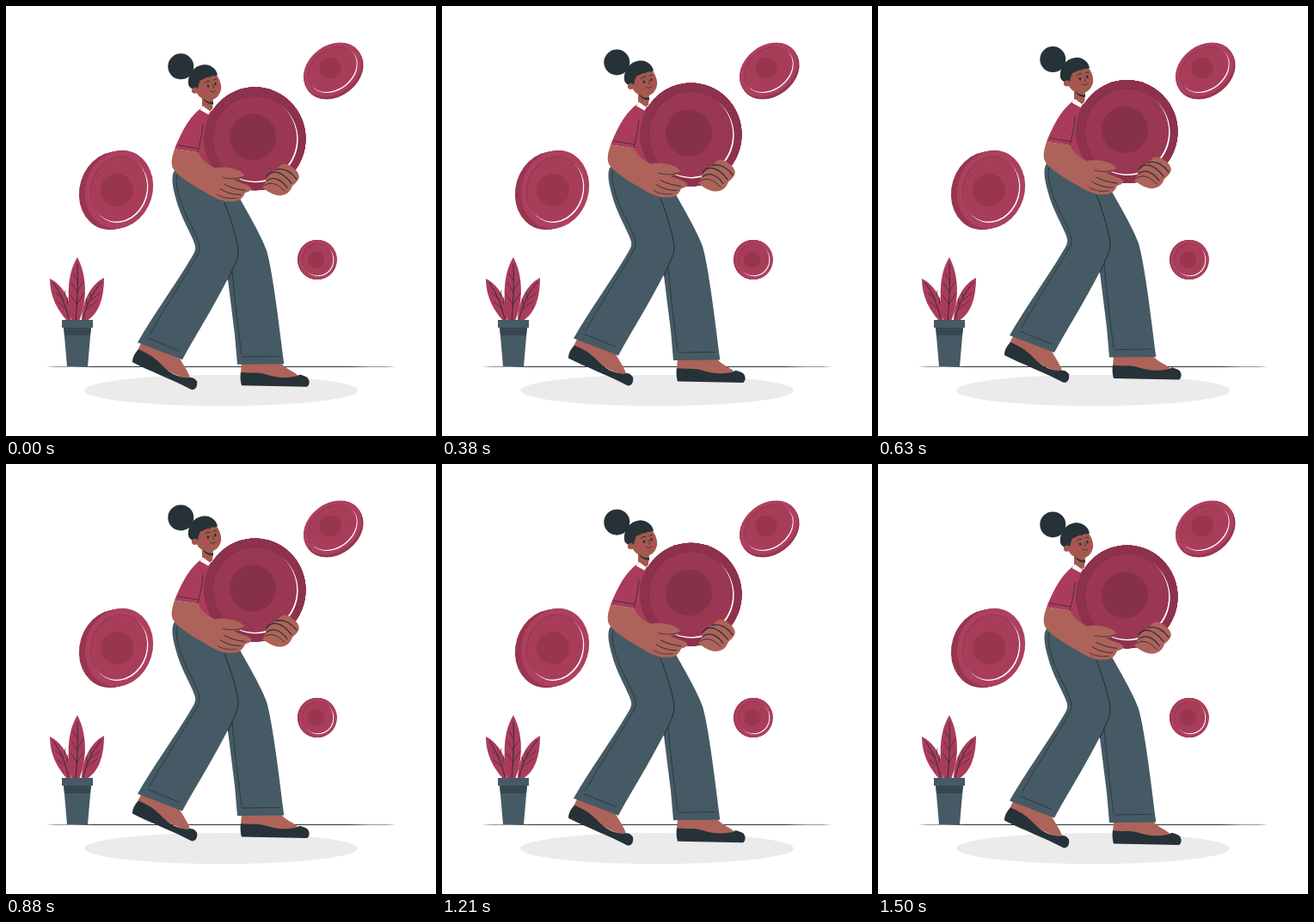
An HTML page with a canvas that plays this animation: 500 px wide and 500 px high, repeating every 1.54 s.

```html
<!DOCTYPE html>
<html lang="en">
<head>
<meta charset="utf-8">
<title>Carrying a coin</title>
<style>
  html, body { margin: 0; width: 100%; height: 100%; overflow: hidden; background: #fff; }
  canvas { display: block; width: 100vw; height: 100vh; }
</style>
</head>
<body>
<canvas id="stage"></canvas>
<script>
const SIZE = 500, LOOP = 1540, PEAK = 733, LIFT = 8.7;
const INK = '#263238', SLATE = '#455a64', SLATE_DARK = '#37474f';
const RED = '#ab3b5b', RED_MID = '#9a3752';
const SKIN = '#ad6359', FACE = '#a3594d';

const canvas = document.getElementById('stage');
const ctx = canvas.getContext('2d');
const scale = window.devicePixelRatio || 1;
canvas.width = canvas.height = SIZE * scale;

const cache = new Map();
function path(d) {
  if (!cache.has(d)) cache.set(d, new Path2D(d));
  return cache.get(d);
}
function fill(d, color) {
  ctx.fillStyle = color;
  ctx.fill(path(d));
}
function stroke(d, width = 0.8, color = INK) {
  ctx.lineWidth = width;
  ctx.strokeStyle = color;
  ctx.stroke(path(d));
}
function oval(x, y, rx, ry, color, turn = 0) {
  ctx.fillStyle = color;
  ctx.beginPath();
  ctx.ellipse(x, y, rx, ry, turn, 0, Math.PI * 2);
  ctx.fill();
}

// Stacked ovals: thick edge, rim, shaded and lit lips, face, plain emblem.
function coin({ x, y, rx, ry, turn = 0, edge = [0, 0], rim, face, dark, inset, lip, emblem }) {
  const [ex, ey] = edge;
  for (let i = 4; i > 0; i--) oval(x + ex * i / 4, y + ey * i / 4, rx, ry, dark, turn);
  oval(x, y, rx, ry, rim, turn);
  const ix = rx * inset, iy = ry * inset;
  oval(x + lip, y + lip, ix, iy, '#fff', turn);
  oval(x - lip * 0.8, y - lip * 0.8, ix, iy, dark, turn);
  oval(x, y, ix - 0.4, iy - 0.4, face, turn);
  oval(emblem[0], emblem[1], emblem[2], emblem[2], dark);
}

function scenery() {
  oval(250, 447, 159, 18, '#ebebeb');
  oval(250, 419.5, 208, 0.55, INK);

  const leaves = [
    ['M71 366C62 356 51 340 51 317C66 324 79 346 75 366Z', 'M73 364C69 347 63 333 55 322',
     'M70 352L60 344M71 347L72 339M67 341L58 334M68 337L69 331'],
    ['M88 366C88 345 98 324 114 316C114 335 110 358 92 367Z', 'M90 364C93 348 102 331 111 321',
     'M94 352L106 343M95 347L93 341M99 342L109 334M99 339L98 333'],
    ['M76 366C72 345 69 315 83 292C95 315 94 345 85 366Z', 'M81 366C83 345 84 321 83 300',
     'M83 348L75 336M83 346L91 334M83 333L76 322M83 331L90 320M83 319L78 311']
  ];
  for (const [shape, rib, veins] of leaves) {
    fill(shape, RED);
    stroke(rib, 1);
    stroke(veins, 0.7);
  }
  fill('M67 373H99L95 419H71Z', SLATE);
  fill('M67 373H99L98 383H68Z', SLATE_DARK);
  fill('M65 365H101V374H65Z', SLATE);

  const small = { rim: '#ad405e', face: '#a83d5a', dark: '#98364f' };
  coin({ ...small, x: 131.5, y: 213.3, rx: 39, ry: 46, turn: 0.3, edge: [-7, 1.5],
         inset: 0.83, lip: 0.9, emblem: [129, 214, 19] });
  coin({ ...small, x: 379.8, y: 74, rx: 37, ry: 28, turn: -0.65, edge: [1.8, 3],
         inset: 0.83, lip: 0.7, emblem: [377, 72, 12.5] });
  coin({ ...small, x: 362.6, y: 295, rx: 22.3, ry: 23, edge: [-1.4, 0],
         inset: 0.81, lip: 0.6, emblem: [360.5, 295, 9.5] });
}

function legs() {
  // back leg and shoe
  fill('M274 414L273 427C290 425 298 429 310 432C322 434 335 433 340 430C336 425 325 422 319 414Z', SKIN);
  fill('M273 425.5C272 431 273 438 274 441L350 442.5C354 440 353 434 350 431.5C345 429 341 427 339 430C325 433 314 432 302 428C291 425 281 427 273 425.5Z', INK);
  fill('M253 227L271 222C281 240 297 267 303 284C310 308 317 366 323.3 416L269 416.5L266 382L258 318Z', SLATE);
  stroke('M263 308C266 341 270 376 274 405');
  stroke('M275 407.5L317 407');

  // front leg and shoe
  fill('M158 390L153 400C165 404 172 408 180 417C192 428 205 433 214 432C212 425 207 418 201 408Z', SKIN);
  fill('M154 399C150 403 147 408 147 414C166 424 196 435 216 446C221 446 223 441 222 436C219 432 216 431 212 432C200 432 190 427 178 414C170 406 161 402 154 399Z', INK);
  fill('M196 191C192 197 193 207 197 222C203 246 215 263 219.5 277C221 282 220 285 217 290C195 327 171 359 153 391L205 411C224 376 249 338 267 298C270 291 271 286 269 277C265 256 260 242 254 226Z', SLATE);
  stroke('M199 196C195 207 204 232 212 248C220 264 226 275 225 284C221 295 185 349 167 382');
  stroke('M165 386L202 401');
  stroke('M254 228C260 243 265 257 269 277C271 286 270 291 267 298L258 318', 1.1);
}

function torso() {
  fill('M229 117C216 126 207 139 196 166L223 170L222 177C229 186 241 190 255 190L262 130L240 122Z', RED);
  stroke('M229 137C228 149 226 158 223 170');
  stroke('M200 161.5L224 165.5');
}

function head() {
  oval(203.3, 70, 15, 15, INK);
  fill('M228 101L241 107L240 120L235 124L228 117Z', FACE);
  fill('M228 105C232 111 237 112 241 111L241 114C235 114 230 111 228 105Z', INK);
  fill('M218 94C218 80 231 74 242 77C248 82 251 91 250 97C248 105 243 109 237 109C230 109 224 106 222 101C216 103 214 98 218 94Z', FACE);
  oval(231.5, 98, 4, 3.2, '#b44f58');
  oval(246, 95.5, 3, 2.8, '#b44f58');
  fill('M212 90C211 77 221 67 233 68C240 69 245 74 246 80C242 81 232 82 225 87L223 96C219 92 218 96 216 96C214 94 212 93 212 90Z', INK);
  stroke('M224 84L225 89M229 83L229 85M236 80L237 83M242 79L243 81', 0.9);
  oval(235, 92.6, 1.3, 1.8, INK, -0.2);
  oval(243.3, 90.2, 1.3, 1.8, INK, -0.2);
  stroke('M231.5 89C233 87 235 86.5 237 87M241 86C242 84.5 244 84.5 245 85.5', 1);
  stroke('M240 91C241 93 243 94.5 240.5 95.5M237.5 98.5C240 100.5 242 100 244 98', 0.8);
  fill('M229 116L225.5 120.5L235.5 126L240 119L237 122Z', '#fff');
}

function heldCoin() {
  coin({ x: 289.5, y: 154, rx: 59, ry: 60, rim: '#8e314c', face: RED_MID, dark: '#87304a',
         inset: 0.83, lip: 1.1, emblem: [287, 152, 27] });
}

function arms() {
  fill('M196 166L224 170C225 176 233 184 243 188C253 186 270 188 276 195C279 199 273 201 265 202C272 206 282 207 285 211C286 214 282 216 278 217C276 222 272 227 264 227C252 228 242 223 231 216C215 207 194 194 193 185C192 179 194 172 196 166Z', SKIN);
  stroke('M276 198C270 201 260 201 252 199');
  stroke('M254 207C261 211 269 213 278 214', 1);
  stroke('M249 212C256 217 264 219 273 219', 1);
  stroke('M246 219C252 223 260 224 268 223');

  fill('M298 211C302 207 301 203 304 199C309 192 315 190 319 185C323 182 329 183 334 188C340 192 342 198 340 201C338 205 335 207 333 209C331 214 328 219 320 220C313 221 305 216 298 211Z', SKIN);
  stroke('M303 198C310 189 321 192 332 206', 1.3);
  stroke('M303 203C310 197 320 201 327 211', 1.2);
  stroke('M314 190C324 187 333 194 338 201', 1.3);
  stroke('M301 208C308 203 317 207 324 215', 0.9);
}

function render(time) {
  const phase = (time % LOOP - PEAK) / LOOP * Math.PI * 2;
  const rise = LIFT * (1 + Math.cos(phase)) / 2;

  ctx.setTransform(scale, 0, 0, scale, 0, 0);
  ctx.fillStyle = '#fff';
  ctx.fillRect(0, 0, SIZE, SIZE);
  ctx.lineCap = ctx.lineJoin = 'round';
  scenery();
  ctx.translate(0, 0.4 - rise);
  legs();
  torso();
  head();
  heldCoin();
  arms();
}

let start;
function tick(now) {
  start ??= now;
  render(now - start);
  requestAnimationFrame(tick);
}
render(0);
requestAnimationFrame(tick);
</script>
</body>
</html>
```
